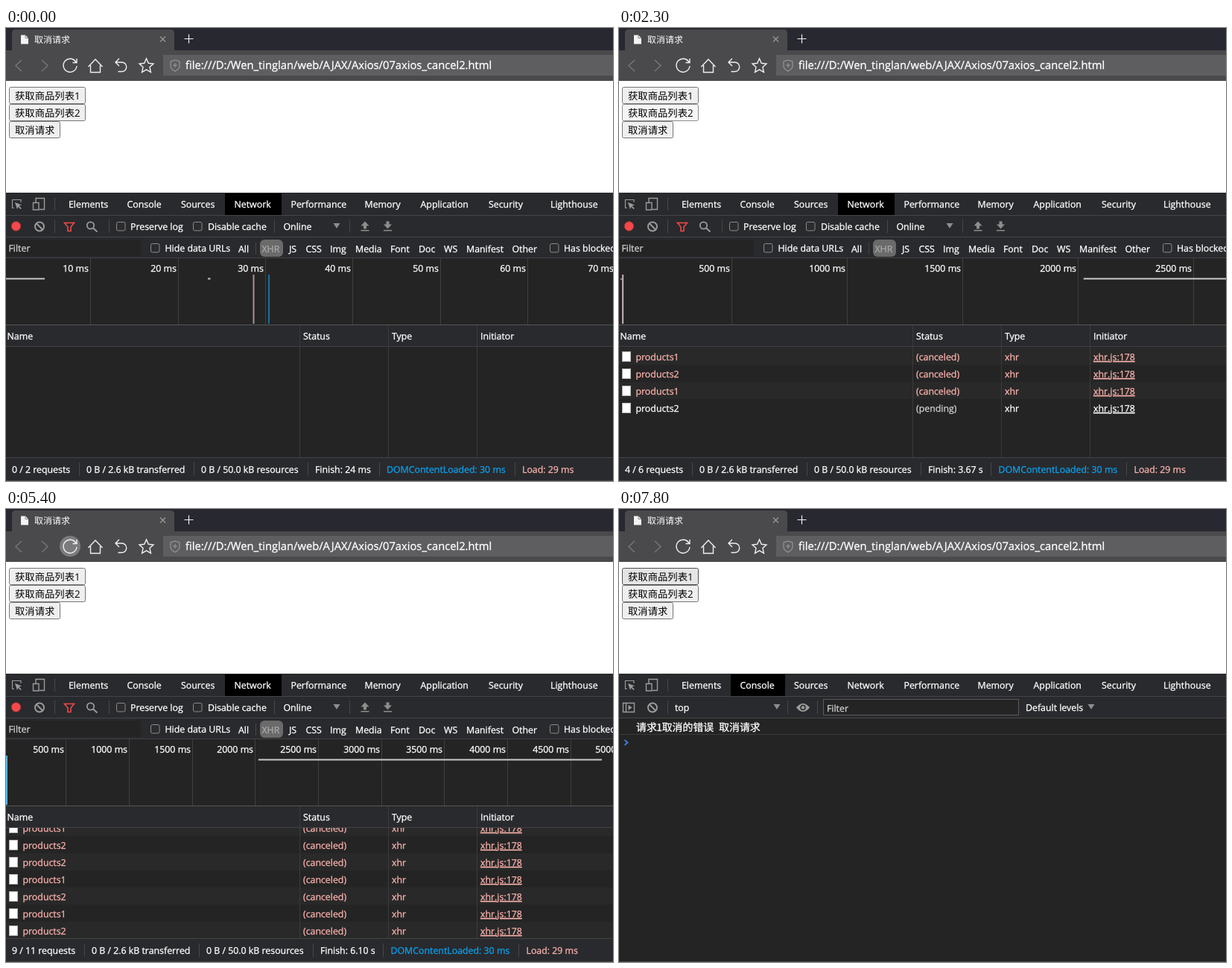
Animation of 815 by 608 pixels, one loop 8 s. Source, as an HTML page:

```html
<!DOCTYPE html>
<html lang="zh">
<head>
<meta charset="utf-8">
<title>取消请求</title>
<style>
html, body { margin: 0; width: 100%; height: 100%; overflow: hidden; background: #242424; }
svg { display: block; width: 815px; height: 608px; }
text {
  font: 12.35px "Open Sans", "Noto Sans CJK SC", sans-serif;
  color: #fff; fill: currentColor; stroke: currentColor; stroke-width: .3;
  text-rendering: geometricPrecision; white-space: pre;
}
.url { font-size: 14.72px; }
.title { font-size: 12px; stroke: none; }
.label { font-size: 13.33px; color: #000; stroke: none; }
.log { font: 13.9px "Noto Sans Mono CJK SC", "Noto Sans CJK SC", monospace; }
.end { text-anchor: end; }
.dim { color: #d0d0d0; }
.pill { color: #a9a9a9; }
.bad { color: #fbb2ad; }
.blue { color: #0aa0ee; }
.link { text-decoration: underline; }
.icon { fill: none; stroke: #9a9a9a; stroke-width: 1.4; }
.nav { fill: none; stroke: #f0f0f0; stroke-width: 1.4; }
.off { stroke: #77777a; }
</style>
</head>
<body>
<svg viewBox="0 0 815 608">
  <defs><clipPath id="list"><rect y="428" width="815" height="148"/></clipPath></defs>

  <!-- browser -->
  <rect width="815" height="30" fill="#282831"/>
  <path d="M8 30V7q0-5 5-5H221q5 0 5 5V30Z" fill="#4a4a4d"/>
  <rect y="30" width="815" height="41" fill="#4a4a4c"/>
  <rect x="211" y="36" width="604" height="28" fill="#5e5e61"/>
  <path d="M20 9.5h6l4 4v8H20Z" fill="#f4f4f4"/>
  <path d="M26 9.5v4h4" fill="none" stroke="#8a8a8a"/>
  <path d="M207 11.5l7 7m0-7l-7 7" class="icon" style="stroke-width:1.2"/>
  <path d="M239.5 14.5h12m-6-6v12" class="nav" style="stroke-width:1.2"/>
  <text x="38" y="20" class="title">取消请求</text>
  <circle id="halo" cx="86" cy="50" r="14" fill="#7b7b7d"/>
  <path d="M21 43l-8 7.5 8 7.5M48 43l8 7.5-8 7.5" class="nav off"/>
  <path d="M94 46a9 9 0 1 0 1 5M95 41v5.500h-5.500" class="nav"/>
  <path d="M110.500 52l9.500-10 9.500 10M113.500 50v9.500h13V50" class="nav"/>
  <path d="M152 41l-5 5 5 5M147.500 46h8a6 6 0 0 1 0 12.500h-5" class="nav"/>
  <path d="M188.500 41l2.800 6.300 6.700.7-5 4.600 1.400 6.700-5.900-3.400-5.900 3.400 1.400-6.700-5-4.600 6.700-.7Z" class="nav"/>
  <path d="M227 43l6 2v6q0 4-6 7-6-3-6-7v-6ZM224 50h6m-3-3v6" class="icon" style="stroke-width:1.1"/>
  <text x="241" y="55" class="url">file:///D:/Wen_tinglan/web/AJAX/Axios/07axios_cancel2.html</text>
  <rect y="71" width="815" height="150" fill="#fff"/>
  <g id="buttons"></g>

  <!-- developer tools -->
  <rect y="221" width="815" height="60" fill="#292a2d"/>
  <rect id="tab" y="222" height="29" fill="#000"/>
  <path d="M0 251.500H815M0 280.500H815" stroke="#454548"/>
  <path d="M65.500 228v17M65.500 257v18" stroke="#47474a"/>
  <path d="M11 241.500H8.500V230.500H20V234" class="icon" style="stroke-width:1.2"/>
  <path d="M12 234l9 3.500-3.500 1.300 3.300 3.300-1.200 1.200-3.300-3.300-1.300 3.300Z" fill="#9a9a9a"/>
  <path d="M40 234v-5.500h11.500v15H45M36.500 234.500h7.500v9.500h-7.500Z" class="icon"/>
  <circle cx="45" cy="266.500" r="6" class="icon" style="stroke-width:2"/>
  <path d="M41 262.500l8 8" class="icon" style="stroke-width:2"/>
  <g id="tabs"></g>

  <g id="network">
    <circle cx="13.500" cy="266" r="6.300" fill="#f5484a" stroke="#8c3436"/>
    <path d="M78.500 261.500H91.500L87 267v5.500H83V267Z" fill="none" stroke="#f0484a" stroke-width="1.600"/>
    <circle cx="113.500" cy="265" r="4.700" class="icon" style="stroke-width:1.800"/>
    <path d="M117 268.500l5.500 5" class="icon" style="stroke-width:2"/>
    <path d="M138.500 257v18M360.500 257v18M461.500 257v18" stroke="#47474a"/>
    <path d="M439.500 262h9l-4.500 7ZM482 259.500l5.500 6h-3.500v4h-4v-4h-3.500ZM476.500 271h11v1.500h-11ZM512.500 269.500l-5.500-6h3.500v-4h4v4h3.500ZM507 271h11v1.500h-11Z" fill="#8d8d8d"/>
    <rect y="281" width="815" height="27" fill="#292a2d"/>
    <rect y="284" width="181" height="22" fill="#242424"/>
    <path d="M335.500 288v16" stroke="#47474a"/>
    <rect x="341" y="284" width="31" height="23" rx="6" fill="#6a6a6a"/>
    <rect y="399" width="815" height="28" fill="#292a2d"/>
    <rect y="577" width="815" height="31" fill="#292a2d"/>
    <path d="M0 308.500H815M0 427.500H815M0 576.500H815" stroke="#424245"/>
    <path d="M0 398.500H815" stroke="#565658"/>
    <g id="labels"></g>
    <g id="timeline"></g>
    <g id="rows" clip-path="url(#list)"></g>
    <path d="M394.500 399V576M513.500 399V576M632.500 399V576" stroke="#3b3b3d"/>
    <g id="status"></g>
  </g>

  <g id="console">
    <path d="M5.500 260.500h15v12h-15ZM9.500 260v13" class="icon"/>
    <path d="M12.500 263l5 3.500-5 3.500Z" fill="#9a9a9a"/>
    <path d="M226.500 257v18M266.500 257v18" stroke="#47474a"/>
    <path d="M207.500 262h9l-4.500 7ZM629.500 262h9l-4.500 7Z" fill="#8d8d8d"/>
    <path d="M238 266.500q9-11 18 0-9 11-18 0Z" fill="#9a9a9a"/>
    <circle cx="247" cy="266.500" r="3" fill="none" stroke="#292a2d" stroke-width="1.500"/>
    <rect x="274.500" y="255.500" width="262" height="21" fill="#242424" stroke="#5a5a5c"/>
    <text x="75" y="271">top</text>
    <text x="279" y="272" class="dim">Filter</text>
    <text x="546" y="271">Default levels</text>
    <g id="log">
      <text x="23" y="298" class="log">请求1取消的错误 取消请求</text>
      <path d="M0 302.500H815" stroke="#3c3c3e"/>
    </g>
    <path id="prompt" d="M7.500 289l4 3.500-4 3.500" fill="none" stroke="#3a80e8" stroke-width="1.800"/>
    <path id="caret" d="M22.500 285.500v14" stroke="#f0f0f0"/>
  </g>
  <path d="M0 607.500H815" stroke="#474245"/>
</svg>

<script>
const LOOP = 8000;
const CLICKS = '121221212';   // which product list each request asked for
const ORIGIN = -4.35;         // x of time zero on the timeline
const $ = id => document.getElementById(id);
const text = (x, y, s, cls = '') => `<text x="${x}" y="${y}" class="${cls}">${s}</text>`;
const rect = (x, y, w, h, fill, more = '') =>
  `<rect x="${x}" y="${y}" width="${w}" height="${h}" fill="${fill}" ${more}/>`;
const vline = (x, y1, y2, color, w = 1) =>
  `<path d="M${x} ${y1}V${y2}" stroke="${color}" stroke-width="${w}"/>`;
const show = (id, on) => $(id).style.display = on ? '' : 'none';

// Each step changes part of the state: btn + mode (pointer), n (requests),
// wait (last one pending), fin (finish time), k (timeline px per ms).
const hover = btn => ({ btn, mode: 'hover' });
const press = btn => ({ btn, mode: 'press' });
const send = (n, fin, k) => ({ mode: 'hover', n, wait: true, fin, k });
const steps = [
  [0, { btn: 0, mode: '', n: 0, wait: false, fin: '24 ms', k: 11.745, late: false,
        reload: false, panel: 'network', caret: true, log: false }],
  [400, press(1)],
  [500, send(1, '24 ms', 1.2)],
  [600, { k: 0.7 }],
  [700, { k: 0.5 }],
  [800, { k: 0.4135, btn: 0 }],
  [1100, press(2)],
  [1200, send(2, '2.56 s', 0.4135)],
  [1400, hover(1)],
  [1600, press(1)],
  [1700, send(3, '3.18 s', 0.38)],
  [1800, { k: 0.34 }],
  [2100, press(2)],
  [2200, send(4, '3.67 s', 0.31)],
  [2300, press(2)],
  [2400, send(5, '3.89 s', 0.28)],
  [2500, { k: 0.2645 }],
  [2700, press(1)],
  [2800, send(6, '4.29 s', 0.2645)],
  [2900, hover(2)],
  [3100, press(3)],
  [3200, { wait: false, fin: '4.70 s', mode: 'hover' }],
  [3500, press(2)],
  [3600, send(7, '4.70 s', 0.235)],
  [3700, { ...press(1), k: 0.22 }],
  [3900, { ...send(8, '5.47 s', 0.2117), btn: 2 }],
  [4000, press(2)],
  [4100, send(9, '5.66 s', 0.2)],
  [4200, { k: 0.19 }],
  [4300, { ...hover(3), k: 0.18 }],
  [4400, press(3)],
  [4500, { wait: false, fin: '6.10 s', mode: 'hover', k: 0.1693 }],
  [4700, { btn: 0 }],
  [5200, { reload: true }],
  [5400, { late: true }],
  [5500, { n: 0, fin: '24 ms', k: 11.745, late: false }],
  [5800, { reload: false }],
  [6400, { panel: 'console' }],
  [6600, hover(2)],
  [6800, { ...press(1), caret: false }],
  [6900, hover(1)],
  [7300, hover(2)],
  [7600, press(2)],
  [7700, { mode: 'hover', log: true }],
  [7800, hover(1)]
];
let last = {};
const states = steps.map(([at, change]) => last = { ...last, ...change, at });

function drawButtons({ btn, mode }) {
  const looks = { hover: ['#e5e5e5', '#4f4f4f'], press: ['#f5f5f5', '#8d8d8d'] };
  $('buttons').innerHTML = ['获取商品列表1', '获取商品列表2', '取消请求'].map((s, i) => {
    const [fill, edge] = btn === i + 1 && looks[mode] || ['#efefef', '#767676'];
    return rect(4.5, 79.5 + 23 * i, i < 2 ? 102 : 68, 22, fill, `stroke="${edge}" rx="2"`) +
      text(12, 96 + 23 * i, s, 'label');
  }).join('');
}

function drawTimeline({ k, n, late }) {
  let step = 10, out = '';
  for (let i = 0; step * k < 64; i++) step *= i % 3 === 1 ? 2.5 : 2;
  for (let i = 1; i * step * k < 880; i++) {
    const x = Math.round(i * step * k + ORIGIN) + 0.5;
    out += vline(x, 309, 398, '#3f3f41') + text(x - 2.5, 327, i * step + ' ms', 'end');
  }
  if (k > 5) {
    out += rect(0, 335.5, 52, 2, '#c4c4c4') + rect(271, 335.5, 3.5, 2, '#c4c4c4') +
      vline(332.5, 331, 397, '#a98f95', 2) + vline(353, 331, 397, '#1b6f9c', 2);
  } else {
    const x = Math.max(1, (k - 0.15) * 32), from = 2025 * k - 4;
    out += vline(x, 331, 397, late ? '#52b4e8' : '#c3b3b7', 2) +
      rect(Math.max(0, x - 3), 336, 1.5, 2, '#aaa');
    if (n && from < 815) out += rect(from, 335.5, Math.min(815, 4749 * k - 4) - from, 2, '#c9c9c9');
  }
  $('timeline').innerHTML = out;
}

function drawRows({ n, wait }) {
  const scroll = Math.max(0, n * 23 - 148);
  let out = '';
  for (let i = 0; i < n; i++) {
    const y = 429 + 23 * i - scroll, open = wait && i === n - 1, c = open ? '' : 'bad';
    if (i % 2 === 0) out += rect(0, y, 815, 23, '#292929');
    out += rect(4.5, y + 5.5, 11, 13, '#fff', 'stroke="#b4b4b4"') +
      text(22.5, y + 17, 'products' + CLICKS[i], c) +
      text(399, y + 17, open ? '(pending)' : '(canceled)', open ? 'dim' : c) +
      text(518, y + 17, 'xhr', c) + text(637, y + 17, 'xhr.js:178', c + ' link');
  }
  $('rows').innerHTML = out;
}

function drawStatus({ n, fin }) {
  const wide = n > 7 ? 7 : 0, tail = fin.endsWith('ms') ? wide : wide - 1.5;
  $('status').innerHTML = [
    [8, `${n} / ${n + 2} requests`],
    [108 + wide, '0 B / 2.6 kB transferred'],
    [262 + wide, '0 B / 50.0 kB resources'],
    [415 + wide, 'Finish: ' + fin],
    [511 + tail, 'DOMContentLoaded: 30 ms', 'blue'],
    [693 + tail, 'Load: 29 ms', 'bad']
  ].map(([x, s, c], i) =>
    (i ? vline(Math.floor(x - 10) + 0.5, 583, 601, '#47474a') : '') + text(x, 597, s, c)).join('');
}

function draw(s) {
  const net = s.panel === 'network';
  drawButtons(s);
  show('halo', s.reload);
  show('network', net);
  show('console', !net);
  $('tab').setAttribute('x', net ? 294 : 150);
  $('tab').setAttribute('width', net ? 76 : 73);
  if (net) {
    drawTimeline(s);
    drawRows(s);
    drawStatus(s);
  }
  show('caret', s.caret);
  show('log', s.log);
  $('prompt').setAttribute('transform', `translate(0 ${s.log ? 21 : 0})`);
}

const tabs = { Elements: 84, Console: 162.5, Sources: 235, Network: 306.5, Performance: 382.5,
  Memory: 481.5, Application: 556.5, Security: 648, Lighthouse: 731 };
$('tabs').innerHTML = Object.entries(tabs).map(([s, x]) => text(x, 241, s)).join('');

const filters = { All: 312, XHR: 343.5, JS: 380, CSS: 402.5, Img: 435, Media: 469, Font: 516,
  Doc: 554, WS: 588, Manifest: 618, Other: 679.5 };
const heads = { Name: 1.5, Status: 399, Type: 518, Initiator: 637 };
const boxes = [[148.5, 260.5], [251.5, 260.5], [194.5, 289.5], [730.5, 289.5]];
$('labels').innerHTML =
  boxes.map(([x, y]) => rect(x, y, 11.5, 11.5, '#2c2c2e', 'stroke="#8a8a8a" rx="2"')).join('') +
  text(167, 271, 'Preserve log') + text(271, 271, 'Disable cache') + text(372.5, 271, 'Online') +
  text(3.5, 300, 'Filter', 'dim') + text(213.5, 300, 'Hide data URLs') +
  text(749, 300, 'Has blocked cookies') +
  Object.entries(filters).map(([s, x]) => text(x, 301, s, s === 'XHR' ? 'pill' : '')).join('') +
  Object.entries(heads).map(([s, x]) => text(x, 418, s)).join('');

let current;
function tick() {
  const t = performance.now() % LOOP;
  const state = states.findLast(s => s.at <= t);
  if (state !== current) draw(current = state);
  requestAnimationFrame(tick);
}
tick();
</script>
</body>
</html>
```
